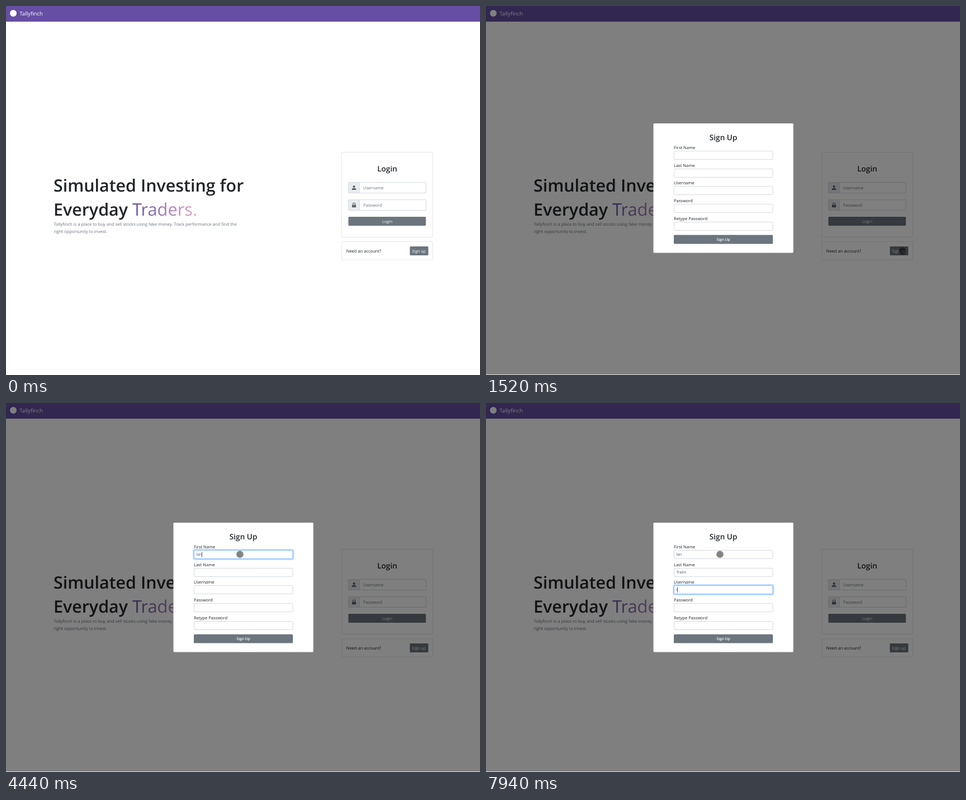
Recreate the animation shown at these times as an HTML page. Size 848 by 660 pixels, loop 8000 ms.

```html
<!DOCTYPE html>
<html lang="en">
<head>
<meta charset="utf-8">
<title>Sign up</title>
<style>
  html, body { margin: 0; width: 100%; height: 100%; overflow: hidden; background: #fff; }
  svg { display: block; width: 848px; height: 660px; }
  text { font-family: "Open Sans", "Noto Sans", sans-serif; font-size: 7.55px; fill: #212529;
         text-rendering: geometricPrecision; white-space: pre; }
  .hero { font-size: 30.4px; font-weight: 600; }
  .accent { font-size: 30.8px; fill: url(#violet); }
  .title { font-size: 13.6px; font-weight: 600; text-anchor: middle; }
  .brand { font-size: 9.65px; fill: #fff; }
  .muted { fill: #6c757d; }
  .lead { font-size: 7.68px; fill: #6c757d; }
  .button { font-size: 7.1px; fill: #fff; text-anchor: middle; }
  .strong { font-size: 6.6px; font-weight: 600; }
  .typed { font-size: 6.8px; fill: #495057; }
  .card { fill: #fff; stroke: #e6e6e6; }
  .input { fill: #fff; stroke: #d5dae0; }
  .addon { fill: #e9ecef; stroke: #d5dae0; }
  .solid { fill: #6c757d; }
  .icon { fill: #5c646c; }
</style>
</head>
<body>
<svg id="stage" viewBox="0 0 848 660"></svg>
<script>
const LOOP = 8000;
const LABELS = ['First Name', 'Last Name', 'Username', 'Password', 'Retype Password'];
const ENTRIES = [
  { value: 'Ian', focus: 2530, keys: [3930, 4030, 4440] },
  { value: 'Trelm', focus: 4750, keys: [5560, 5840, 6030, 6260, 6460] },
  { value: 'i', focus: 7150, keys: [7940] },
];
const FIELD_X = 336.5, FIELD_Y = 263.5, FIELD_PITCH = 31.7, TEXT_X = 340.4;
const fieldY = i => FIELD_Y + Math.round(i * FIELD_PITCH);

const text = (x, y, cls, str) => `<text x="${x}" y="${y}" class="${cls}">${str}</text>`;
const box = (x, y, w, h, cls, attrs = '') =>
  `<rect x="${x}" y="${y}" width="${w}" height="${h}" rx="1.5" class="${cls}" ${attrs}/>`;

const loginRow = (y, label, icon) =>
  box(612.5, y, 139, 19, 'input') +
  `<path class="addon" d="M632.5 ${y}h-18q-2 0-2 2v15q0 2 2 2h18z"/>` +
  text(639, y + 12.4, 'muted', label) +
  `<g transform="translate(622.6 ${y + 9.5})">${icon}</g>`;

const USER = '<circle class="icon" cy="-2" r="2.1"/><path class="icon" d="M-3.8 4V3Q-3.8.7-1.4.7H1.4Q3.8.7 3.8 3V4z"/>';
const LOCK = '<rect class="icon" x="-3.6" y="-.6" width="7.2" height="4.8" rx=".8"/>' +
  '<path d="M-2-.4V-2a2 2 0 0 1 4 0V-.4" fill="none" stroke="#5c646c" stroke-width="1.2"/>';

const page = `
  <defs><linearGradient id="violet" gradientUnits="userSpaceOnUse" x1="226" x2="350" y1="0" y2="0">
    <stop stop-color="#654ea3"/><stop offset="1" stop-color="#eaafc8"/></linearGradient></defs>
  <rect width="848" height="660" fill="#fff"/>
  <rect width="848" height="28" fill="#654ea3"/>
  <circle cx="13" cy="13" r="6" fill="#fff"/>` +
  text(24.3, 17.4, 'brand', 'Tallyfinch') +
  text(85, 331.8, 'hero', 'Simulated Investing for') +
  text(85, 374.6, 'hero', 'Everyday') +
  text(226, 374.6, 'accent', 'Traders.') +
  text(85.4, 393.4, 'lead', 'Tallyfinch is a place to buy and sell stocks using fake money. Track performance and find the') +
  text(85.4, 405.7, 'lead', 'right opportunity to invest.') +
  box(600.5, 261.5, 163, 152, 'card') +
  text(682, 296, 'title', 'Login') +
  loginRow(315.5, 'Username', USER) +
  loginRow(346.5, 'Password', LOCK) +
  box(612.5, 377, 138.7, 16, 'solid') +
  text(682, 387.7, 'button', 'Login') +
  box(600.5, 421.5, 163, 32.5, 'card') +
  text(608.7, 440.6, '', 'Need an account?') +
  box(722.5, 430, 33, 16, 'solid') +
  text(738.7, 440.6, 'button', 'Sign up');

const field = (label, i) => {
  const y = fieldY(i);
  return text(336, y - 3.1, '', label) +
    box(FIELD_X, y, 176.5, 15, 'input') +
    `<g class="glow" opacity="0">
      <rect x="335" y="${y - 1.5}" width="179.5" height="18" rx="3" fill="none" stroke="#007bff" stroke-opacity=".25" stroke-width="2"/>
      ${box(FIELD_X, y, 176.5, 15, '', 'fill="none" stroke="#80bdff"')}</g>` +
    text(TEXT_X, y + 9.8, 'typed', '');
};

const modal = '<g id="modal">' +
  box(299.5, 214, 250.3, 231.5, '', 'fill="#fff"') +
  text(424.6, 244.2, 'title', 'Sign Up') +
  LABELS.map(field).join('') +
  box(336, 413.7, 177.2, 15.8, 'solid') +
  text(424.6, 424.2, 'button strong', 'Sign Up') +
  '<rect id="caret" width=".7" height="10" fill="#222"/></g>';

const stage = document.getElementById('stage');
stage.innerHTML = page +
  '<rect id="backdrop" width="848" height="659.2"/>' + modal +
  '<g id="pointer"><circle r="7" fill-opacity=".14"/><circle r="6.1" fill-opacity=".4"/></g>';

const find = id => document.getElementById(id);
const parts = {
  backdrop: find('backdrop'), modal: find('modal'), caret: find('caret'), pointer: find('pointer'),
  glows: [...document.querySelectorAll('.glow')],
  typed: [...document.querySelectorAll('.typed')],
};

const progress = (t, start, end) => Math.min(1, Math.max(0, (t - start) / (end - start)));
const easeOut = (p, power) => 1 - (1 - p) ** power;
const mix = (a, b, p) => a + (b - a) * p;

function drawPointer(t) {
  const first = easeOut(progress(t, 100, 1020), 2.5);
  const second = easeOut(progress(t, 1560, 2200), 2.5);
  const x = mix(mix(824, 745, first), 418.5, second);
  const y = mix(mix(647, 438.3, first), 270.7, second);
  parts.pointer.setAttribute('transform', `translate(${x} ${y})`);
}

function drawModal(t) {
  const fade = progress(t, 1320, 1470);
  const slide = easeOut(progress(t, 1320, 1620), 1.65);
  parts.backdrop.setAttribute('opacity', fade / 2);
  parts.modal.setAttribute('opacity', fade);
  parts.modal.setAttribute('transform', `translate(0 ${mix(-25, 0, slide)})`);
}

function drawEntries(t) {
  const glowIn = ENTRIES.map(e => t < e.focus ? 0 : progress(t, e.focus - 50, e.focus + 100));
  parts.caret.setAttribute('opacity', 0);
  ENTRIES.forEach((entry, i) => {
    const pressed = entry.keys.filter(k => k <= t);
    const label = parts.typed[i];
    label.textContent = entry.value.slice(0, pressed.length);
    parts.glows[i].setAttribute('opacity', glowIn[i] * (1 - (glowIn[i + 1] || 0)));
    if (t < entry.focus || glowIn[i + 1]) return;
    const lastInput = pressed.length ? pressed[pressed.length - 1] : entry.focus;
    const visible = Math.floor((t - lastInput) / 490) % 2 === 0;
    const width = pressed.length ? label.getComputedTextLength() : 0;
    parts.caret.setAttribute('x', TEXT_X + width);
    parts.caret.setAttribute('y', fieldY(i) + 2.6);
    parts.caret.setAttribute('opacity', visible ? 1 : 0);
  });
}

function draw() {
  const t = performance.now() % LOOP;
  // Movement is refreshed ten times a second, like a screen recording.
  const tick = Math.floor((t - 20) / 100) * 100 + 20;
  parts.pointer.setAttribute('opacity', t < 100 ? 0 : 1);
  drawPointer(tick);
  drawModal(tick);
  drawEntries(t);
  requestAnimationFrame(draw);
}
draw();
</script>
</body>
</html>
```
